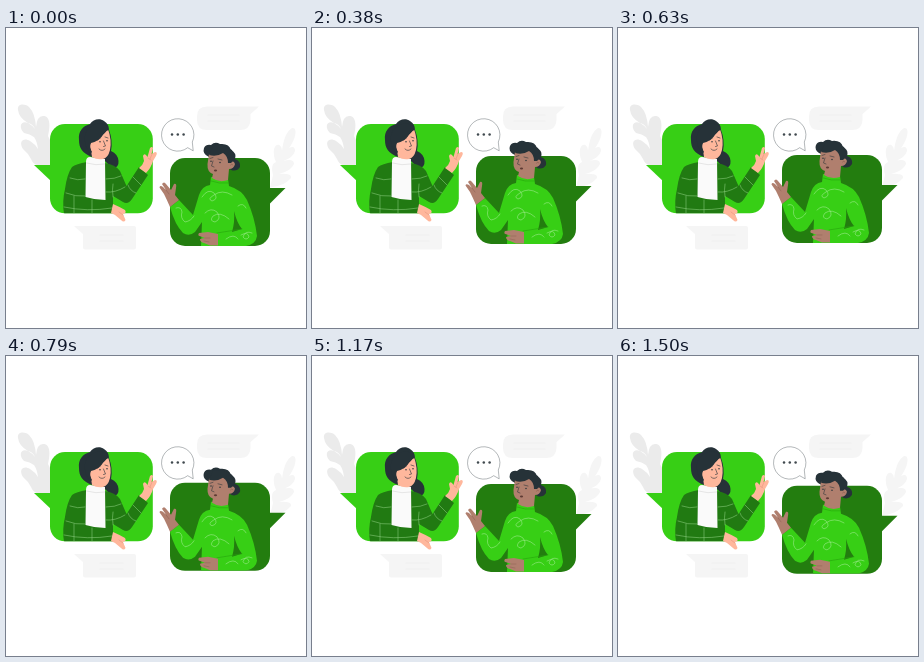
These frames come from a looping animation (300x300 px, 1540 ms). An HTML page:

```html
<!DOCTYPE html>
<html lang="en">
<head>
<meta charset="utf-8">
<title>Two people talking</title>
<style>
html, body { margin: 0; width: 100%; height: 100%; overflow: hidden; background: #fff; }
svg { display: block; width: 100vw; height: 100vh; }
.line { fill: none; stroke-linecap: round; stroke-linejoin: round; }
</style>
</head>
<body>
<svg viewBox="0 0 300 300">
  <defs>
    <clipPath id="leftClip"><path d="M44 80H147V170Q147 185.300 132 185.300H59Q44 185.300 44 170Z"/></clipPath>
    <clipPath id="rightClip"><path d="M150 100H264V203Q264 218 249 218H179Q164 218 164 203L150 190Z"/></clipPath>
  </defs>

  <!-- plants and pale bubbles -->
  <g fill="#ebebeb">
    <path d="M44 137H31Q27 136 25 131Q22 125 17 121C12 113 18 109 24 113Q29 116 32 121Q31 113 28 109Q24 106 18 105C12 99 15 92 22 95Q26 97 29 101Q27 96 22 95Q13 90 12 82C11 76 18 75 23 79Q29 85 30 99Q31 87 38 88C45 89 44 100 42 108L44 112Z"/>
  </g>
  <g fill="#f5f5f5">
    <path d="M264 160L267 147Q264 136 270 134Q267 128 268 121C270 114 276 116 276 123Q278 105 286 100C292 99 290 111 283 120Q289 117 289 123Q287 130 277 133Q288 130 288 136Q285 143 273 146Q286 145 285 150Q278 158 266 159Z"/>
    <path d="M201 78.500H253L244.500 86V92Q244 102 234 102H201Q191 102 191 92V88.500Q191 78.500 201 78.500Z"/>
    <path d="M68 198H128Q130 198 130 200V219.500Q130 221.500 128 221.500H79Q77 221.500 77 219.500V206Z"/>
  </g>
  <g class="line" stroke="#ebebeb" stroke-width=".6">
    <path d="M94 207H117M94 213H117M202 87H233M202 93H233"/>
  </g>

  <!-- left speaker -->
  <path d="M28 137H46V154Z" fill="#37cf15"/>
  <rect x="44" y="96" width="102.800" height="89.300" rx="15" fill="#37cf15"/>
  <path d="M86 129C76 125 73 120 73 112C72 103 77 98 84 96C87 91 94 90 98 93Q103 96 103 102Q107 112 105 123Q112 126 112.500 133Q113 139 107 141L99 133Z" fill="#263238"/>
  <g clip-path="url(#leftClip)">
    <path d="M81 134Q70 136 66 139Q61 146 59 161Q56 173 58 186H107L107 168L117 174Q122 177 126 171L142 147L133 139L120.500 158L114 143Q110 137 99 135Z" fill="#217a12"/>
    <path d="M80 134Q80 129 84 129L99 131L99.500 172Q89 172 79.500 169Z" fill="#fafafa"/>
    <path class="line" d="M80.500 135Q90 138 99 136" stroke="#c4c4c4" stroke-width=".4"/>
    <path class="line" d="M64 150Q72 153 79 151M60 165Q70 169 79 168M58 179Q81 184 106 180M100 151Q109 151 115 148M100 164Q109 165 119 159M68 168V185M86 172V185M107 169Q106 161 107 156M127 149L135 157M122 157Q124 163 130 165" stroke="#8ed080" stroke-width=".55"/>
  </g>
  <path d="M86 113Q96 110 102 101Q106 112 104 122Q102 130 97 131Q91 132 86 129L85 122Q82 117 86 113Z" fill="#ffb79c"/>
  <path d="M86 124Q83 119 85 115Q94 113 98 105Q101 102 103 102Q99 94 90 96Q80 100 79 108Q78 118 84 126Z" fill="#263238"/>
  <path class="line" d="M91.500 112L94.500 110M99 109L102 110M97.500 113L99.500 118L97.500 118.500M93 121Q96 124 99 121" stroke="#263238" stroke-width=".6"/>
  <g fill="#263238"><circle cx="94" cy="113.800" r=".75"/><circle cx="101" cy="112.800" r=".75"/></g>
  <path d="M133 140Q137 137 138 133L137 128Q138 125 140 127L141.500 129L144 120Q146 118 147 120L145.500 126L149 124Q152 124 150 128L147 133Q145 140 140 145Z" fill="#ffb79c"/>
  <path d="M107 176Q114 179 119 182Q121 185 117 186L119.500 192Q118 195 115 192L109 187L105 185Z" fill="#ffb79c"/>
  <path class="line" d="M142 130L145 132M146 126L144 131M113 184L117 187" stroke="#df8f78" stroke-width=".5"/>

  <!-- typing bubble -->
  <path d="M181.700 119.700A16.200 16.200 0 1 1 186.300 114L187.200 122.800Z" fill="#fff" stroke="#263238" stroke-width=".35" stroke-linejoin="round"/>
  <g fill="#40494e"><circle cx="166" cy="106.500" r="1.250"/><circle cx="171.800" cy="106.500" r="1.250"/><circle cx="177.600" cy="106.500" r="1.250"/></g>

  <!-- right speaker -->
  <g id="speaker">
    <path d="M262 160H279.500L262 177.500Z" fill="#237d0f"/>
    <rect x="164" y="130" width="100" height="88" rx="15" fill="#237d0f"/>
    <path d="M203 129Q196 126 198 120Q200 116 205 117Q209 113 214 116Q223 115 225 122Q231 125 229 131Q235 133 234 139Q231 144 225 142L216 131Z" fill="#263238"/>
    <g clip-path="url(#rightClip)">
      <path d="M204 157Q196 158 193 167L187 187L173 172L164 179Q169 197 177 205Q183 209 189 204L196 194L195 218H240Q250 216 251 208Q249 190 241 172Q236 162 223 158L222 151L205 149Z" fill="#37cf15"/>
      <path d="M228 183Q231 195 236 201L226 204Q229 194 228 183Z" fill="#237d0f"/>
      <path class="line" d="M236 201L211 205M205 153Q213 156 222 155" stroke="#25a50c" stroke-width=".6"/>
      <path class="line" d="M196 169Q202 160 208 165Q213 171 206 173Q201 171 208 167Q216 161 226 167M199 185Q205 179 211 184Q216 191 209 194Q203 193 207 188Q214 183 223 191M232 178Q237 174 240 180M170 180Q175 178 176 184Q174 190 179 194Q185 193 188 188M220 211Q228 205 232 211M235 207Q242 203 243 209Q240 213 237 209Q239 202 246 205" stroke="#a5eb96" stroke-width=".55"/>
    </g>
    <path d="M203 126Q212 127 218 122L224 128L224 134Q228 132 229 136Q228 141 223 141L222 152Q213 155 206 150L207 146Q201 144 201.500 136Z" fill="#b07f6e"/>
    <path d="M203 127Q211 129 217 125Q222 128 222 135L225 135L229 131L226 122L218 118L207 118Z" fill="#263238"/>
    <path class="line" d="M204 130.500L207 129.500M212 131L216 132M207 133L205.500 138L208 139" stroke="#263238" stroke-width=".55"/>
    <path class="line" d="M224.500 137Q226 135 227 137" stroke="#7d5548" stroke-width=".5"/>
    <ellipse cx="209.500" cy="142.500" rx="1.600" ry="1" fill="#5d3b34"/>
    <g fill="#263238"><circle cx="205" cy="133.300" r=".75"/><circle cx="214" cy="134.500" r=".75"/></g>
    <path d="M164 179Q161 172 158 166L153.500 159.500Q154 157 157 159L160 162L156 156Q158 153 160 156L165 162L168 156Q171 155 170 160L169 167L173 172Z" fill="#b07f6e"/>
    <path d="M212 206L202 204L193 205Q191 208 195 208.500L199 210L194 211Q194 214 198 215L204 217.500H212Z" fill="#b07f6e"/>
    <path class="line" d="M160 162L163 166M199 210L204 210M198 213L203 214" stroke="#8b5f50" stroke-width=".5"/>
  </g>
</svg>
<script>
const COUNT = 37, LOOP = 1540, STEP = 1000 / 24, RISE = 3.2;
const speaker = document.getElementById("speaker");
const start = performance.now();

function draw(time) {
  const step = Math.min(COUNT - 1, Math.floor(time / STEP + 0.12));
  const lift = RISE * Math.sin(Math.PI * step / COUNT) ** 1.3;
  speaker.setAttribute("transform", `translate(0 ${-lift.toFixed(3)})`);
}

function tick() {
  draw((performance.now() - start) % LOOP);
  requestAnimationFrame(tick);
}
tick();
</script>
</body>
</html>
```
